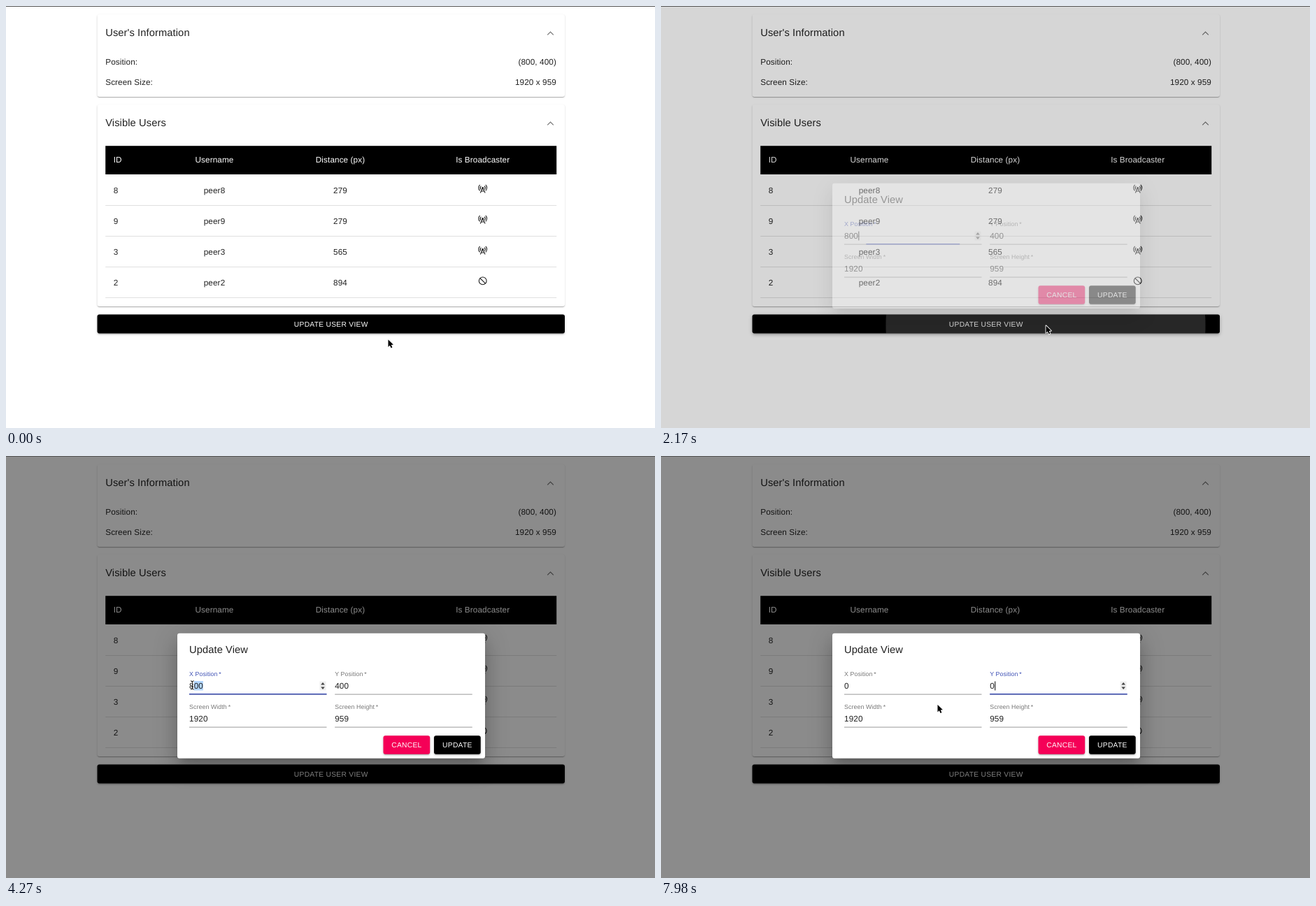
Write an HTML page with a canvas that moves like this. It is 928 by 604 pixels and loops after 8000 ms.

```html
<!DOCTYPE html>
<html lang="en">
<head>
<meta charset="utf-8">
<title>Update view dialog</title>
<style>
html, body { margin: 0; width: 100%; height: 100%; overflow: hidden; background: #fff; }
canvas { display: block; }
</style>
</head>
<body>
<canvas id="stage" width="928" height="604"></canvas>
<script>
const LOOP = 8000, STEP = 70;
const S = 11 / 15; // page zoom
const W = 928, H = 604;
const INK = '#212121', BLUE = '#3f51b5', GREY = 'rgba(0,0,0,.54)';
const DIGIT = 16 * S * (0.556 + 0.00938);

const ENTER = 1420, PRESS = 2018, OPEN = 2104;
const DRAG_X = 3480, TYPE_X = 4760, FOCUS_Y = 6510, TYPE_Y = 6850;

const stage = document.getElementById('stage').getContext('2d');
const layer = document.createElement('canvas');
layer.width = W;
layer.height = H;
const sheet = layer.getContext('2d');
let c = stage;

// ---- timing

const clamp = v => Math.max(0, Math.min(1, v));
const mix = (a, b, p) => a + (b - a) * p;

function bezier(x1, y1, x2, y2) {
  const at = (a, b, s) => 3 * (1 - s) * (1 - s) * s * a + 3 * (1 - s) * s * s * b + s * s * s;
  return x => {
    let lo = 0, hi = 1;
    for (let i = 0; i < 24; i++) {
      const mid = (lo + hi) / 2;
      if (at(x1, x2, mid) < x) lo = mid; else hi = mid;
    }
    return at(y1, y2, (lo + hi) / 2);
  };
}
const linear = x => x;
const easeInOut = bezier(0.4, 0, 0.2, 1);
const easeOut = bezier(0, 0, 0.2, 1);

function tween(t, start, length, ease = easeInOut) {
  const p = clamp((t - start) / length);
  return p === 0 || p === 1 ? p : ease(p);
}

// pointer moves: start, length, target
const MOVES = [
  [0, 70, 554, 461],
  [140, 210, 557, 452],
  [700, 70, 557.5, 447],
  [1400, 280, 550.5, 457.5],
  [2380, 420, 421, 325],
  [2800, 350, 302, 305],
  [3290, 210, 284, 328],
  [3500, 350, 267, 328],
  [4200, 210, 265, 328],
  [4690, 770, 310, 325],
  [5600, 700, 482, 328],
  [6300, 140, 490, 328],
  [6510, 280, 471, 328],
  [7490, 490, 395.5, 356]
];

function pointer(t) {
  let x = 546.5, y = 477.5;
  for (const [start, length, tx, ty] of MOVES) {
    const p = tween(t, start, length, linear);
    x = mix(x, tx, p);
    y = mix(y, ty, p);
  }
  return { x, y };
}

// ---- drawing helpers

function rect(x, y, w, h, fill) {
  c.fillStyle = fill;
  c.fillRect(x, y, w, h);
}

function box(x, y, w, h, r, fill) {
  c.beginPath();
  c.roundRect(x, y, w, h, r);
  c.fillStyle = fill;
  c.fill();
}

function disc(x, y, r, fill) {
  c.beginPath();
  c.arc(x, y, r, 0, 2 * Math.PI);
  c.fillStyle = fill;
  c.fill();
}

function arc(x, y, r, from = 0, to = 2 * Math.PI) {
  c.beginPath();
  c.arc(x, y, r, from, to);
  c.lineWidth = 1.1;
  c.strokeStyle = INK;
  c.stroke();
}

function line(points, width, color) {
  c.beginPath();
  points.forEach(([x, y]) => c.lineTo(x, y));
  c.lineWidth = width;
  c.strokeStyle = color;
  c.stroke();
}

function text(str, x, y, { size = 16, color = INK, align = 'left', track = 0.00938 } = {}) {
  const px = size * S;
  c.font = px + 'px "Liberation Sans", Arial, sans-serif';
  c.letterSpacing = px * track + 'px';
  c.textRendering = 'geometricPrecision';
  c.textAlign = align;
  c.fillStyle = color;
  c.fillText(str, x, y);
}

function shadow(x, y, w, h, alpha, dy, blur, spread) {
  const away = 2000, g = spread * S;
  c.save();
  c.shadowColor = `rgba(0,0,0,${alpha})`;
  c.shadowBlur = blur * S;
  c.shadowOffsetX = away;
  c.shadowOffsetY = dy * S;
  box(x - g - away, y - g, w + 2 * g, h + 2 * g, Math.max(0, 3 + g), '#000');
  c.restore();
}

// three shadows that grow with the elevation e
function raised(x, y, w, h, e, fill) {
  shadow(x, y, w, h, 0.2, 1.5 + 0.4 * e, 0.6 * e, -0.5 - 0.27 * e);
  shadow(x, y, w, h, 0.14, e, 1.55 * e, Math.max(0, (e - 4) * 0.15));
  shadow(x, y, w, h, 0.12, 1 + e / 3, 2 + 1.85 * e, Math.max(0, (e - 2) / 3));
  box(x, y, w, h, 3, fill);
}

function button(label, x, y, w, h, fill, elevation = 2) {
  raised(x, y, w, h, elevation, fill);
  text(label, x + w / 2, y + h / 2 + 3.6, { size: 14, color: '#fff', align: 'center', track: 0.02857 });
}

function chevron(x, y) {
  line([[x - 4.3, y + 2.2], [x, y - 2.1], [x + 4.3, y + 2.2]], 1.2, '#757575');
}

function tower(x, y) {
  line([[x - 3.4, y + 6.2], [x, y - 1], [x + 3.4, y + 6.2]], 1.1, INK);
  line([[x - 2, y + 3.6], [x + 2, y + 3.6]], 1, INK);
  disc(x, y - 1.2, 1.3, INK);
  for (const side of [0, Math.PI]) {
    for (const r of [3.4, 5.9]) arc(x, y - 1.2, r, side - 0.8, side + 0.8);
  }
}

function ban(x, y) {
  arc(x, y, 5.4);
  line([[x - 3.8, y - 3.8], [x + 3.8, y + 3.8]], 1.2, INK);
}

// ---- page

function heading(label, y) {
  text(label, 142.2, y + 5, { size: 20, track: 0.0075 });
  chevron(778.5, y + 0.8);
}

function pair(label, value, y) {
  text(label, 142.2, y);
  text(value, 787, y, { align: 'right' });
}

const COLUMNS = [['ID', 153.7], ['Username', 298], ['Distance (px)', 478], ['Is Broadcaster', 681.7]];
const ROWS = [[8, 279], [9, 279], [3, 565], [2, 894]];

function cells(values, y, color) {
  values.forEach((v, i) => text(v, COLUMNS[i][1], y, { color, align: i ? 'center' : 'left' }));
}

function table() {
  rect(142.2, 200.2, 645, 40.8, '#000');
  cells(COLUMNS.map(col => col[0]), 224.3, '#fff');
  ROWS.forEach(([id, distance], i) => {
    const y = 241 + 44 * i;
    cells([id, 'peer' + id, distance], y + 26.8, INK);
    (i < 3 ? tower : ban)(COLUMNS[3][1], y + 20.4);
    rect(142.2, y + 44, 645, 1, '#e0e0e0');
  });
}

function updateBar(t) {
  const x = 130.5, y = 441.5, w = 668.5, h = 27;
  const lift = 2 + 2 * tween(t, ENTER, 250) + 4 * tween(t, PRESS, 140);
  button('UPDATE USER VIEW', x, y, w, h, '#000', mix(lift, 2, tween(t, OPEN, 140)));

  const radius = 421 * tween(t, PRESS, 280, linear);
  const fade = 1 - tween(t, 2250, 550);
  c.save();
  c.beginPath();
  c.roundRect(x, y, w, h, 3);
  c.clip();
  disc(550, 457, radius, `rgba(255,255,255,${0.18 * fade})`);
  c.restore();
}

function page(t) {
  rect(0, 0, W, H, '#fff');
  raised(130.5, 12, 668.5, 118, 1, '#fff');
  heading("User's Information", 38.3);
  pair('Position:', '(800, 400)', 83.7);
  pair('Screen Size:', '1920 x 959', 113);
  raised(130.5, 141, 668.5, 289, 1, '#fff');
  heading('Visible Users', 167.3);
  table();
  updateBar(t);
}

// ---- dialog

function spinner(x, y) {
  rect(x - 4.5, y - 6.5, 9, 13, '#efefef');
  for (const d of [-1, 1]) {
    c.beginPath();
    c.moveTo(x - 2.8, y + 1.6 * d);
    c.lineTo(x + 2.8, y + 1.6 * d);
    c.lineTo(x, y + 5 * d);
    c.fillStyle = '#444';
    c.fill();
  }
}

function field(label, value, x, y, { focus = 0, on = false, hover = false, from = value.length, caret = false } = {}) {
  const w = 196.5, end = x + value.length * DIGIT;
  text(label + '\u2009*', x, y + 14.5, { size: 12, color: on ? BLUE : GREY });
  rect(x + from * DIGIT, y + 22, end - x - from * DIGIT, 13.5, '#b3d6fd');
  text(value, x, y + 33.2);
  if (on || hover) spinner(x + 191, y + 29);
  if (hover && !on) rect(x, y + 40, w, 1.4, INK);
  else rect(x, y + 40.7, w, 0.8, 'rgba(0,0,0,.5)');
  rect(x + w / 2 * (1 - focus), y + 40, w * focus, 1.5, BLUE);
  if (caret) rect(end + 0.4, y + 22.5, 1, 13, '#000');
}

const blink = (t, start) => t >= start && (t - start) % 1000 < 500;
const selectFrom = (mx, x) => Math.round(3 * clamp((mx - x) / DIGIT / 3));

function dialog(t, m) {
  const left = 262, right = 470.2;
  const onY = t >= FOCUS_Y;
  const dragX = t >= DRAG_X && t < TYPE_X;
  const dragY = onY && t < TYPE_Y;
  const focusY = tween(t, FOCUS_Y, 200, easeOut);
  raised(245, 253.7, 440, 179, 24, '#fff');
  text('Update View', left, 281.8, { size: 20, track: 0.0075 });
  field('X Position', t < TYPE_X ? '800' : '0', left, 300, {
    on: !onY,
    focus: tween(t, OPEN, 200, easeOut) - focusY,
    from: dragX ? selectFrom(m.x, left) : undefined,
    caret: !onY && !dragX && blink(t, t < TYPE_X ? OPEN : TYPE_X)
  });
  field('Y Position', t < TYPE_Y ? '400' : '0', right, 300, {
    on: onY,
    focus: focusY,
    hover: inField(m, right, 320),
    from: dragY ? selectFrom(m.x, right) : undefined,
    caret: blink(t, TYPE_Y)
  });
  field('Screen Width', '1920', left, 347);
  field('Screen Height', '959', right, 347);
  button('CANCEL', 539.5, 400.3, 66.7, 26.4, '#f50057');
  button('UPDATE', 612, 400.3, 66.7, 26.4, '#000');
}

// ---- pointer shapes

const inField = (m, x, y) => m.x >= x && m.x <= x + 197 && m.y >= y && m.y <= y + 22;
const overText = m => [262, 470].some(x => [320, 367].some(y => inField(m, x, y)));

function arrow({ x, y }) {
  const shape = [[0, 0], [0, 10.4], [2.3, 8.2], [4.1, 12.1], [5.9, 11.3], [4.3, 7.5], [7.4, 7.3]];
  c.beginPath();
  shape.forEach(([dx, dy]) => c.lineTo(x + dx, y + dy));
  c.closePath();
  c.lineJoin = 'round';
  c.lineWidth = 1.8;
  c.strokeStyle = '#fff';
  c.stroke();
  c.fillStyle = '#000';
  c.fill();
  c.lineJoin = 'miter';
}

function beam({ x, y }) {
  for (const [width, color] of [[2.4, 'rgba(255,255,255,.7)'], [1, '#000']]) {
    line([[x, y - 5.5], [x, y + 5.5]], width, color);
    for (const d of [-1, 1]) {
      line([[x - 2.3, y + 6.2 * d], [x, y + 5.2 * d], [x + 2.3, y + 6.2 * d]], width, color);
    }
    line([[x - 1.5, y + 2], [x + 1.5, y + 2]], width, color);
  }
}

// ---- loop

function draw(t) {
  const m = pointer(t);
  const dim = tween(t, OPEN, 225);
  const shown = tween(t, OPEN + 35, 105);
  c = stage;
  page(t);
  rect(0, 0, W, H, `rgba(0,0,0,${0.455 * dim})`);
  if (shown > 0) {
    c = sheet;
    c.clearRect(0, 0, W, H);
    dialog(t, m);
    c = stage;
    c.globalAlpha = shown;
    c.drawImage(layer, 0, 0);
    c.globalAlpha = 1;
  }
  rect(0, 0, W, 1, '#555');
  if (shown === 1 && overText(m)) beam(m); else arrow(m);
}

let began;
function tick(now) {
  began ??= now;
  const t = (now - began) % LOOP;
  draw(Math.floor(t / STEP) * STEP);
  requestAnimationFrame(tick);
}
draw(0);
requestAnimationFrame(tick);
</script>
</body>
</html>
```
